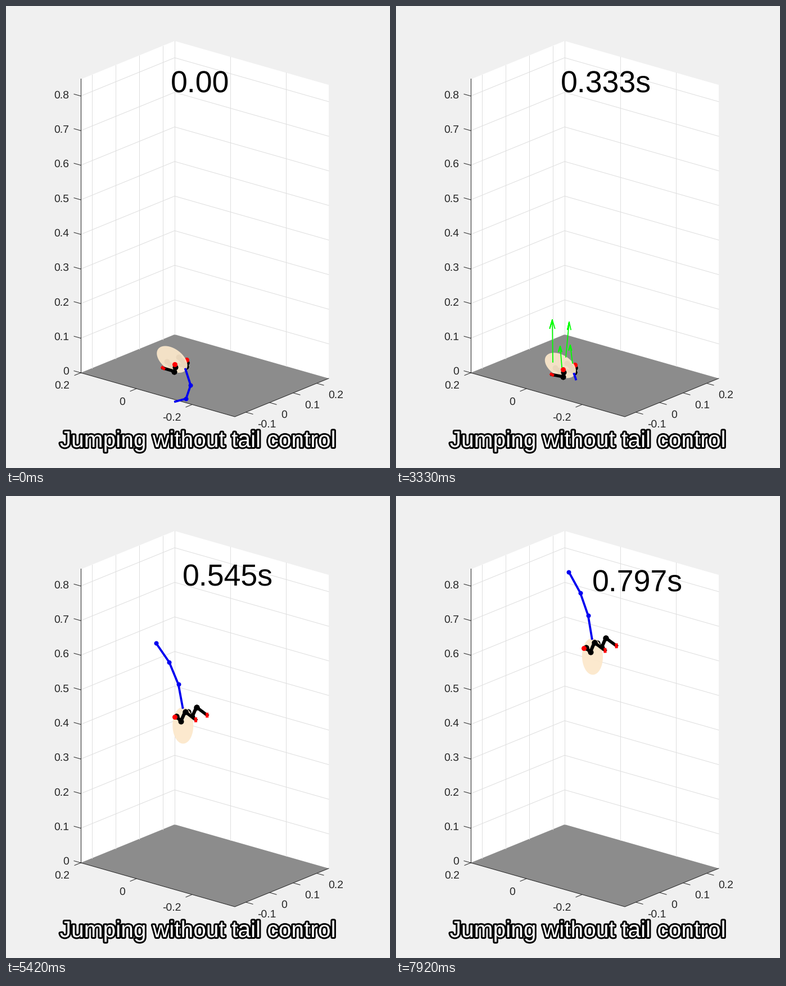
Recreate the animation shown at these times as a matplotlib script. Size 683 px wide and 820 px high, loop 8000 ms.

```python
import numpy as np
import matplotlib.pyplot as plt
from matplotlib.animation import FuncAnimation
from matplotlib.patches import Polygon
from matplotlib.patheffects import withStroke

W, H, DPI = 683, 820, 64
PT = 72 / DPI
FRAMES, INTERVAL = 200, 40
INK = "#262626"

plt.rcParams["font.family"] = "Liberation Sans"
plt.rcParams["text.hinting"] = "none"

# Screen pixels per metre along the forward, lateral and vertical axes.
FWD = np.array([-495.0, -141.0])
LAT = np.array([420.0, -171.0])
UP = np.array([0.0, -614.0])
SLOPE = 0.2847

fig = plt.figure(figsize=(W / DPI, H / DPI), dpi=DPI, facecolor="#f0f0f0")
ax = fig.add_axes([0, 0, 1, 1])
ax.set_xlim(0, W)
ax.set_ylim(H, 0)
ax.axis("off")


def line(xs, ys, color=INK, width=1.0, z=2, **kw):
    return ax.plot(xs, ys, color=color, lw=width * PT, zorder=z, **kw)[0]


def dots(color, size, z):
    return line([], [], color, 0, z, marker="o", ms=size * PT, mew=0)


def label(x, y, s, ha):
    ax.text(x, y + 7, s, size=19.4 * PT, color=INK, ha=ha, va="baseline")


def draw_box():
    left, back, right, front = (133, 651), (300, 583), (574, 661), (407, 729)
    rise, grid = 521, "#dedede"
    for a, b in ((left, back), (back, right)):
        wall = [a, b, (b[0], b[1] - rise), (a[0], a[1] - rise)]
        ax.add_patch(Polygon(wall, fc="white", ec="none", zorder=0))
    ax.add_patch(Polygon([left, back, right, front], fc="#8c8c8c", ec="none", zorder=1))

    for i in range(9):
        d = 61.4 * i
        if i:
            line([133, 300, 574], [651 - d, 583 - d, 661 - d], grid)
        line([133, 121], [651 - d, 647.6 - d])
        label(112, 647 - 61.3 * i, f"{i / 10:g}", "right")
    line([300, 300], [583, 583 - rise], grid)

    for i in range(4):
        x, y = 153 + 42 * i, 643 - 17.1 * i
        line([x, x], [y, y - rise], grid)
        x, y = x + 274, y + 78
        line([x, x + 12], [y, y + 3.4])
        label(447 + 42 * i, 741 - 17.3 * i, f"{(i - 1) / 10:g}", "left")
    for i in range(3):
        x, y = 133 + 99 * i, 651 + 28.2 * i
        line([x, x - 11], [y, y + 4.5])
        label(113 + 99.5 * i, 672 + 28.5 * i, f"{0.2 - 0.2 * i:g}", "right")
        if i:
            line([x + 167] * 2, [y - 68, y - 68 - rise], grid)

    line([133, 133], [129, 651])
    line([133, 407, 574], [651, 729, 661])


# Leg joints as (forward, dorsal) metres from the body centre.
HIP = np.array([-0.029, 0.0095])
MOTOR = np.array([-0.032, 0.002])
CROUCHED = np.array([[-0.002, 0.001], [-0.034, -0.0106], [0.004, -0.024]])
EXTENDED = np.array([[-0.0215, -0.0133], [-0.052, -0.029], [-0.037, -0.067]])
TAIL_ROOT = np.array([-0.051, 0.0])
SEG = 0.0655
LONG, SHORT, HALF_WIDTH = 0.0515, 0.0285, 0.024
FALL = 0.3065  # half of gravity, in pixels per step squared

draw_box()


class Leg:
    def __init__(self, side, z):
        self.side, self.z = side, z
        joint = dict(marker="o", ms=10 * PT, mew=0)
        self.thigh = line([], [], "black", 6, z, **joint)
        self.shank = line([], [], "black", 5.5, z, markevery=[0], **joint)
        self.motor = dots("black", 10, z)
        self.foot = line([], [], "red", 5, z + 0.1, solid_capstyle="butt")
        self.hip = dots("red", 9, z + 0.1)

    def pose(self, centre, axes, shape):
        base = centre + self.side * HALF_WIDTH * LAT
        knee, ankle, foot = base + shape @ axes
        motor, toe = base + MOTOR @ axes, 0.007 * axes[0]
        tucked = np.allclose(shape, CROUCHED)
        self.thigh.set_zorder(3 if tucked else self.z)
        self.thigh.set_data(*np.array([motor, knee, ankle]).T)
        self.shank.set_data(*np.array([ankle, foot]).T)
        self.motor.set_data(*motor[:, None])
        self.hip.set_data(*(base + HIP @ axes)[:, None])
        self.foot.set_data(*np.array([foot - toe, foot + toe]).T)


far_leg, near_leg = Leg(1, 3), Leg(-1, 6)
body = ax.add_patch(Polygon(np.zeros((3, 2)), fc="#fce8cb", ec="none", alpha=0.93, zorder=4))
tail = line([], [], "#0000f0", 3.8, 5)
knots = dots("#0000f0", 8, 5)
clock = ax.text(293, 153.5, "", size=53.6 * PT, color="black", va="baseline", zorder=8)
ax.text(341.5, 783, "Jumping without tail control", size=40.7 * PT, color="white",
        ha="center", va="baseline", zorder=9,
        path_effects=[withStroke(linewidth=6 * PT, foreground="black")])

arrows = []
for x, y, dx, dy, half in ((279, 632, -1, -75, 4.5), (302, 623, 6, -62, 3),
                           (295, 641, -3, -37, 3), (314, 634, -4, -32, 2.5)):
    back = 0.15 * abs(dy) + 4
    xs = [x, x + dx, x + dx - half, x + dx, x + dx + half]
    ys = [y, y + dy, y + dy + back, y + dy, y + dy + back]
    arrows.append(line(xs, ys, "#00ff00", 1.8, 7))

turn = np.linspace(0, 2 * np.pi, 73)
CIRCLE = np.array([np.cos(turn), np.sin(turn)])


def swing(k, peak):
    return np.cos(2 * np.pi * (k - peak) / 40)


def body_pitch(k):
    spin = 138.5 + 14.9 * (k - 46) + 14 * swing(k, 50)
    return max(15 + 5 * np.exp(-k / 3), spin)


def tail_shape(k):
    """Tail points relative to the root: it rests, then trails the spinning body."""
    lag = -5 - 17 * swing(k, 47)
    j = np.arange(3)
    angle = np.maximum(246, body_pitch(k) + 180 + lag * (1 + 1.3 * j))
    a = np.radians(angle + 45 * j * np.exp(-k / 5))
    size = SEG * (1 - 0.3 * np.exp(-k / 3))
    steps = size * (np.outer(np.cos(a), FWD) + np.outer(np.sin(a), UP))
    return np.vstack([[0, 0], np.cumsum(steps, axis=0)])


def mass_centre(k):
    x = 294 + 1.4 * max(0, k - 39)
    ground = min(645, 631 + FALL * k ** 2)
    return np.array([x, min(ground, 271.5 + FALL * (k - 74.5) ** 2)])


def above_floor(p, k):
    edge = 655.5 + SLOPE * (p[:, 0] - 294) + 45 * np.exp(-k / 5)
    return np.where((p[:, 1] <= edge)[:, None], p, np.nan)


def update(i):
    # Ten steps a second, shown on a clock of twelve pictures a second.
    picture = 12 * (INTERVAL * i + 30) // 1000
    k = (10 * picture + 5) // 12

    p = np.radians(body_pitch(k))
    axes = np.array([np.cos(p) * FWD + np.sin(p) * UP,
                     np.cos(p) * UP - np.sin(p) * FWD])
    push = np.clip((k - 37) / 4, 0, 1)
    shape = CROUCHED + push * (EXTENDED - CROUCHED)
    tail_pts = tail_shape(k)

    # Tail and legs pull the body away from the common centre of mass.
    centre = mass_centre(k) - 0.05 * tail_pts[-1] - 0.08 * shape[-1] @ axes

    m = np.column_stack([LONG * axes[0], SHORT * axes[1], SHORT * LAT])
    body.set_xy((np.linalg.cholesky(m @ m.T) @ CIRCLE).T + centre)
    for leg in (far_leg, near_leg):
        leg.pose(centre, axes, shape)

    tail_pts = tail_pts + centre + TAIL_ROOT @ axes
    s = np.linspace(0, 3, 91)
    fine = np.column_stack([np.interp(s, range(4), c) for c in tail_pts.T])
    tail.set_data(*above_floor(fine, k).T)
    knots.set_data(*above_floor(tail_pts[1:], k).T)

    for arrow in arrows:
        arrow.set_visible(7 <= k <= 39)
    dx = 1.4 * max(0, k - 39)
    clock.set_position((293 + dx, 153.5 + SLOPE * dx))
    clock.set_text(f"{k * 0.01009:.3g}s" if k else "0.00")
    return []


anim = FuncAnimation(fig, update, frames=FRAMES, interval=INTERVAL,
                     init_func=lambda: update(0), repeat=True, repeat_delay=0)
plt.show()
```
